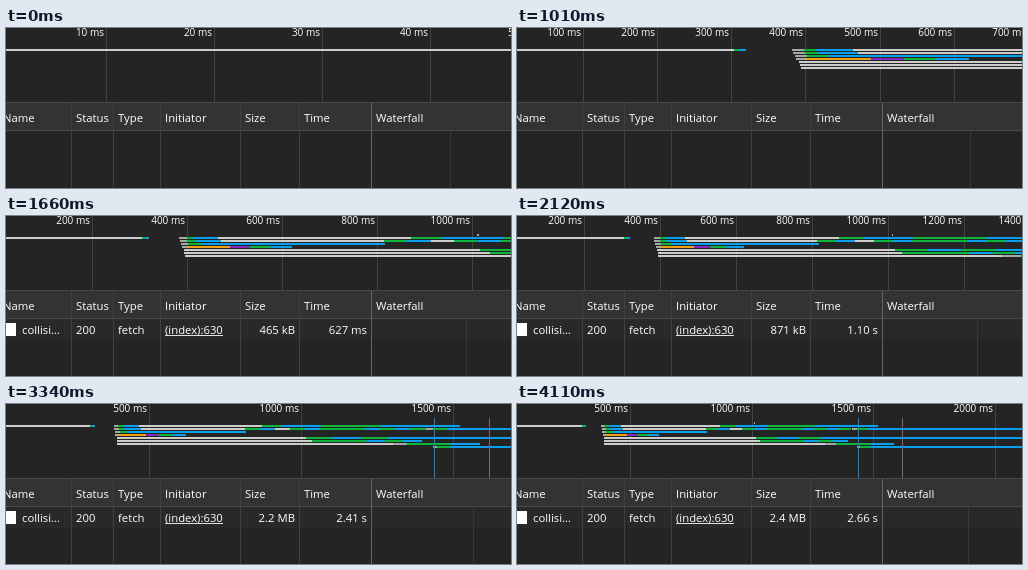
Recreate the animation shown at these times as an HTML page with a canvas. Size 505 px wide and 160 px high, loop 4.66 s.

```html
<!DOCTYPE html>
<html lang="en">
<head>
<meta charset="utf-8">
<title>Network panel</title>
<style>
html, body { margin: 0; width: 505px; height: 160px; overflow: hidden; background: #242424; }
canvas { display: block; }
</style>
</head>
<body>
<canvas id="stage" width="505" height="160"></canvas>
<script>
const ctx = document.getElementById('stage').getContext('2d');
const LOOP = 4660, PAINT = 77.4, ORIGIN = -8;
const FONT = '"Open Sans", "Noto Sans", sans-serif';
const COLORS = { w: '#cccccc', q: '#a6a6a6', o: '#f0a010', p: '#8228c0', g: '#0cb43c', b: '#08a0f0' };
const OPEN = 'g'.padEnd(30, 'b');

// Lane, start, end of waiting, end (ms), then equal phases after the wait.
const REQUESTS = [
  [0, 0, 304, 320, 'gb'],
  [0, 382, 398, 464, 'gbbb'],
  [1, 384, 400, 471, 'gbbb'],
  [2, 386, 402, 816, 'g'.padEnd(14, 'b')],
  [3, 388, 401, 620, 'oopgb'],
  [1, 471, 813, 1408, 'gbwgbgggbgbg'],
  // Requests queued later
  [0, 464, 871, 1520, 'gbbgggbbbb'],
  [4, 392, 1016, 2800, 'gbgb'.padEnd(20, 'b')],
  [5, 393, 1036, 1395, 'gggbgb'],
  [6, 394, 1300, 1586, 'qgggbb'],
  [1, 1411, 1434, 2800, OPEN],
  [7, 1431, 1445, 2800, OPEN],
  [-1, 1010, 1013, 1013, '']
];
const FIRST_BATCH = 6;

// Key points, by paint number: waterfall grid line x; elapsed ms; received kB
const GRID = [[-8, 444], [-7, 488], [-4, 468], [0, 442], [8, 460], [19, 460],
  [26, 492], [35, 467], [39, 461], [44, 461], [45, 451]];
const ELAPSED = [[6, 83], [8, 233], [19, 1100], [26, 1660], [35, 2410], [39, 2660]];
const SIZE = [[6, 1], [8, 126], [19, 871], [26, 1400], [35, 2200], [39, 2400]];

function lerp(keys, p) {
  const i = keys.findIndex(k => k[0] > p);
  if (i < 0) return keys[keys.length - 1][1];
  if (i === 0) return keys[0][1];
  const [p0, a] = keys[i - 1], [p1, b] = keys[i];
  return a + (b - a) * (p - p0) / (p1 - p0);
}

// The visible time span grows by a quarter whenever the clock outruns it.
function level(p, lag = 0) {
  if (p < 0) return p < -7 ? 0 : p < -2 ? 7 : 10;
  return Math.max(11, 16 + Math.floor(Math.log((p - lag + 11.5) / 37.5) / Math.log(1.25)));
}
const zoom = n => 10.8 * 1.25 ** -n;
const toX = (ms, scale) => Math.floor(ORIGIN + ms * scale);

function box(x, y, w, h, color) {
  ctx.fillStyle = color;
  ctx.fillRect(x, y, w, h);
}
function text(s, x, y, align = 'left', size = 11.3) {
  ctx.font = size + 'px ' + FONT;
  ctx.textAlign = align;
  ctx.fillStyle = '#ffffff';
  ctx.fillText(s, x, y);
}

function drawRuler(scale) {
  let step = 1;
  for (let i = 0; step * scale < 64; i++) step *= [2, 2.5, 2][i % 3];
  for (let ms = step; ms * scale < 560; ms += step) {
    const x = toX(ms, scale);
    box(x, 0, 1, 74, '#434343');
    text(ms + ' ms', x - 2, 8, 'right', 10);
  }
}

function drawRequest([lane, start, wait, end, phases], scale) {
  const y = 21 + 3 * lane, x = ms => toX(ms, scale);
  const bar = (a, b, key) => box(x(a), y, x(b) - x(a), 2, COLORS[key]);
  bar(start, wait, wait - start < 50 ? 'q' : 'w');
  const part = (end - wait) / phases.length;
  [...phases].forEach((key, i) => bar(wait + i * part, wait + (i + 1) * part, key));
}

function drawRow(p) {
  text('collisi…', 16, 118);
  text('200', 70, 118);
  text('fetch', 112, 118);
  text('(index):630', 159, 118);
  box(159, 119, 58, 1, '#e0e0e0');
  box(-2, 107, 12, 13, '#ffffff');
  const kb = lerp(SIZE, p), ms = lerp(ELAPSED, p);
  text(kb < 1000 ? Math.round(kb) + ' kB' : (kb / 1000).toFixed(1) + ' MB', 289, 118, 'right');
  text(ms < 1000 ? Math.round(ms) + ' ms' : (ms / 1000).toFixed(2) + ' s', 361, 118, 'right');
}

function drawTable(p) {
  const loaded = p >= 6;
  if (loaded) box(0, 103, 505, 21, '#292929');
  box(0, 74, 505, 29, '#333333');
  box(0, 74, 505, 1, '#484848');
  box(0, 102, 505, 1, '#484848');
  for (const x of [65, 107, 154, 234, 293]) box(x, 75, 1, 85, '#404040');
  box(Math.round(lerp(GRID, p)), 103, 1, 57, '#383838');
  box(365, 75, 1, 85, '#646464');
  const heads = { Name: -3, Status: 70, Type: 112, Initiator: 159, Size: 239, Time: 298, Waterfall: 370 };
  for (const name in heads) text(name, heads[name], 94);
  if (loaded) drawRow(p);
}

function draw(t) {
  const p = Math.min(45, Math.floor((t - 620) / PAINT));
  const scale = zoom(level(p));
  box(0, 0, 505, 160, '#242424');
  drawRuler(zoom(level(p, 0.4)));
  const shown = p > 0 ? REQUESTS : REQUESTS.slice(0, FIRST_BATCH);
  shown.forEach(r => drawRequest(r, scale));
  box(toX(1436, scale), 14, 1, 60, '#1687d4');
  box(toX(1618, scale), 14, 1, 60, '#80666a');
  drawTable(p);
}

const begin = performance.now();
function tick() {
  draw((performance.now() - begin) % LOOP);
  requestAnimationFrame(tick);
}
tick();
</script>
</body>
</html>
```
